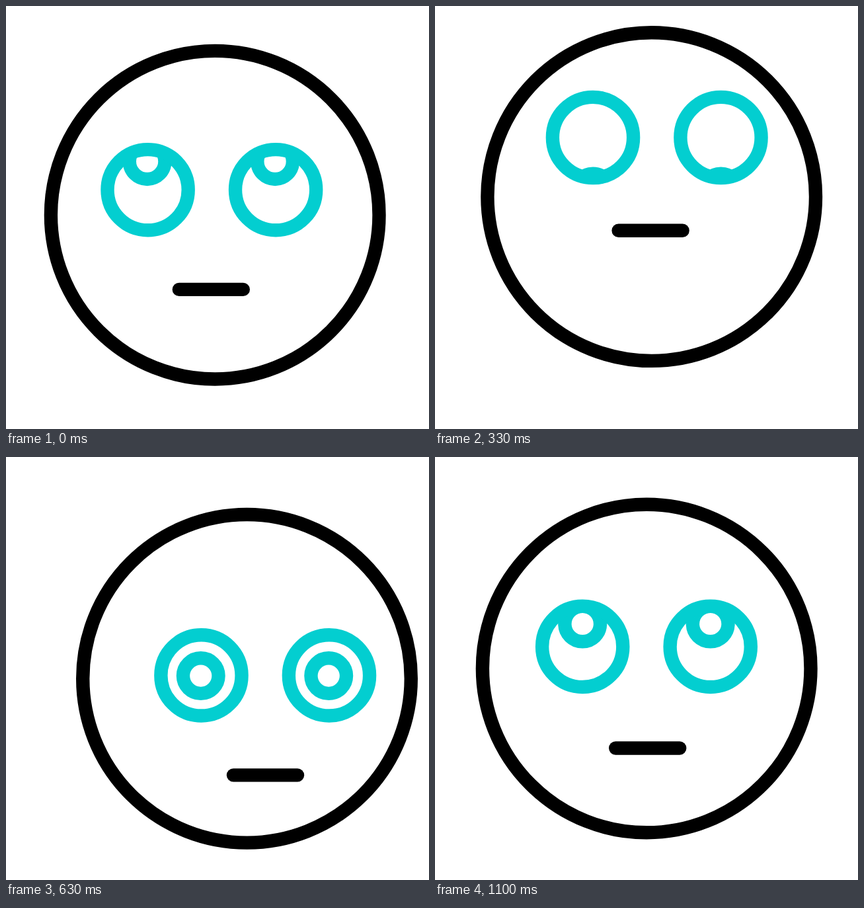
These frames come from a looping animation (640 by 640 pixels, 1.67 s). An HTML page:

```html
<!DOCTYPE html>
<html lang="en">
<head>
<meta charset="utf-8">
<title>Rolling eyes</title>
<style>
  html, body { margin: 0; width: 100%; height: 100%; overflow: hidden; background: #fff; }
  svg { display: block; width: 100%; height: 100%; }
</style>
</head>
<body>
<svg viewBox="0 0 640 640" fill="none" stroke-width="20.4">
  <defs>
    <clipPath id="lid"><circle r="61"/></clipPath>
    <g id="eye" stroke="#03ced0">
      <g clip-path="url(#lid)"><circle class="pupil" r="26.8"/></g>
      <circle r="61.1"/>
    </g>
  </defs>
  <circle id="head" r="248.3" stroke="#000"/>
  <g id="eyes">
    <use href="#eye"/>
    <use href="#eye" x="193.5"/>
  </g>
  <path id="mouth" d="M-48.5 0H48.5" stroke="#000" stroke-linecap="round"/>
</svg>
<script>
const LOOP = 1670, LAST = 33;

// Key poses, in steps of 1/30 s
const steps = [0, 4, 5, 10, 16, 21, 22, 28, 32, 33];
const head = {
  x: [316.2, 295.5, 292, 327.7, 370.4, 355.5, 351.1, 327, 320.2, 320.2],
  y: [316.2, 297.2, 292.7, 288.6, 309, 345.8, 344.7, 325.8, 320, 320]
};
const eyes = {
  x: [214.6, 169.8, 163, 239, 313.8, 275.3, 267, 217, 220.5, 223.2],
  y: [278.2, 232.8, 224, 199, 277.3, 350.3, 348.8, 315.6, 291.2, 286.9]
};
const mouth = {
  x: [310.3, 251, 241.5, 326.1, 409.5, 372.5, 364.2, 315.6, 318.9, 321.7],
  y: [428.9, 368.2, 356.5, 339.8, 426.7, 501.6, 500.2, 469.2, 445, 440.5]
};

// Pupil offset from the eye after it comes back from below
const pupilSteps = [10, 16, 22, 28, 33];
const pupilX = [0, -1.3, 0, 0, 0];
const pupilY = [81.5, 26.3, -19.8, -34.2, -34.4];

function slope(ts, vs, i) {
  const rate = k => (vs[k + 1] - vs[k]) / (ts[k + 1] - ts[k]);
  if (i === 0) return rate(0);
  if (i === ts.length - 1) return rate(i - 1);
  const a = ts[i] - ts[i - 1], b = ts[i + 1] - ts[i];
  return (rate(i - 1) * b + rate(i) * a) / (a + b);
}

// Cubic Hermite curve through the keys
function curve(ts, vs, t) {
  let i = 0;
  while (i < ts.length - 2 && t >= ts[i + 1]) i++;
  const h = ts[i + 1] - ts[i], u = (t - ts[i]) / h, w = 1 - u;
  return vs[i] * w * w * (1 + 2 * u) + vs[i + 1] * u * u * (3 - 2 * u)
    + h * u * w * (slope(ts, vs, i) * w - slope(ts, vs, i + 1) * u);
}

function move(node, x, y) {
  node.setAttribute("transform", `translate(${x.toFixed(2)} ${y.toFixed(2)})`);
}

const parts = [["head", head], ["eyes", eyes], ["mouth", mouth]]
  .map(([id, path]) => [document.getElementById(id), path]);
const pupil = document.querySelector(".pupil");

function draw(ms) {
  const tick = Math.floor((ms % LOOP) / 10);
  const n = Math.min(LAST, Math.floor((3 * tick + 1) / 10));
  for (const [node, path] of parts) {
    move(node, curve(steps, path.x, n), curve(steps, path.y, n));
  }
  // Leaves over the top, then re-enters from the bottom
  if (n < 7) move(pupil, -1, -43 - 11.4 * n);
  else move(pupil, curve(pupilSteps, pupilX, n), curve(pupilSteps, pupilY, n));
}

const start = performance.now();
function frame() {
  draw(performance.now() - start);
  requestAnimationFrame(frame);
}
frame();
</script>
</body>
</html>
```
